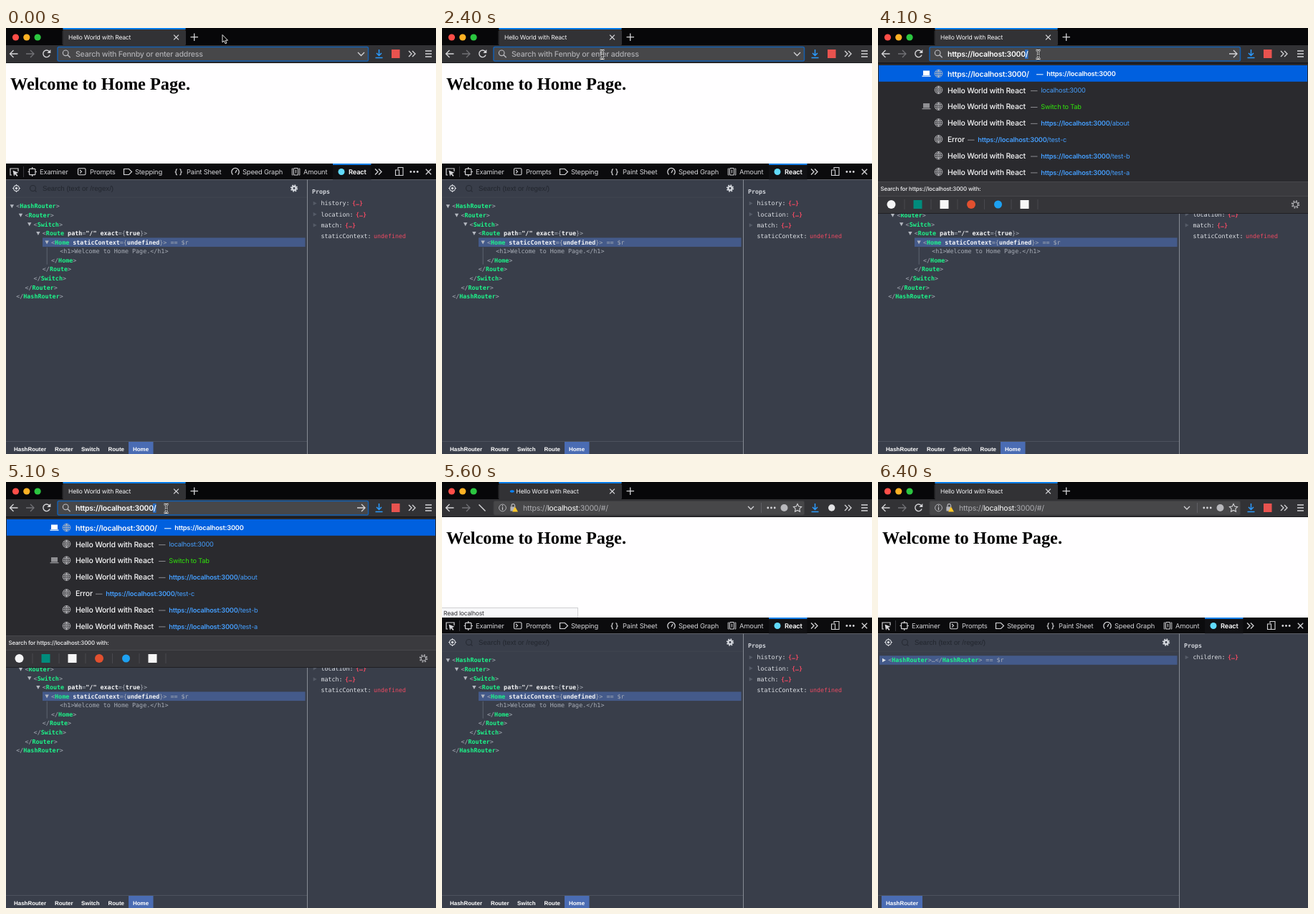
These frames come from a looping animation (600x594 px, 6.5 s). An HTML page:

```html
<!DOCTYPE html>
<html lang="en">
<head>
<meta charset="utf-8">
<title>Router demo</title>
<style>
html, body { margin: 0; width: 100%; height: 100%; overflow: hidden; background: #fff; }
svg { display: block; width: 100%; height: 100%; }
text { white-space: pre; text-rendering: geometricPrecision; }
.ui { font-family: Inter, Roboto, sans-serif; letter-spacing: -.02em; }
.mono { font: 8.4px "DejaVu Sans Mono", monospace; fill: #a9aeb8; }
.arial { font-family: "Liberation Sans", Arial, sans-serif; }
.serif { font-family: "Liberation Serif", Times, serif; }
.b { font-weight: bold; }
.tag { fill: #1df58a; font-weight: bold; }
.attr { fill: #f4f5f7; font-weight: bold; }
.red { fill: #ee4a62; }
</style>
</head>
<body>
<svg id="stage" viewBox="0 0 600 594"></svg>
<script>
const LOOP = 6500;
const PASTE = 2500, LOAD = 5200, CONNECT = 5700, READY = 6300;
const LIGHT = '#d5d5d8';

const esc = s => s.replace(/&/g, '&amp;').replace(/</g, '&lt;');
const rect = (x, y, w, h, fill, extra = '') =>
  `<rect x="${x}" y="${y}" width="${w}" height="${h}" fill="${fill}" ${extra}/>`;
const circle = (x, y, r, fill, extra = '') =>
  `<circle cx="${x}" cy="${y}" r="${r}" fill="${fill}" ${extra}/>`;
const line = (d, color = LIGHT, w = 1.3, extra = '') =>
  `<path d="${d}" fill="none" stroke="${color}" stroke-width="${w}" ${extra}/>`;
const shape = (d, fill = LIGHT) => `<path d="${d}" fill="${fill}"/>`;
const text = (x, y, size, fill, s, cls = 'ui', extra = '') =>
  `<text x="${x}" y="${y}" class="${cls}" fill="${fill}" font-size="${size}" ${extra}>${s}</text>`;
const group = (id, ...parts) => `<g id="${id}">${parts.join('')}</g>`;
const span = (cls, s) => `<tspan class="${cls}">${esc(s)}</tspan>`;
const medium = 'font-weight="500"';
const semi = 'font-weight="600"';

const dots = (x, y, fill = LIGHT) =>
  [-4.7, 0, 4.7].map(d => circle(x + d, y, 1.4, fill)).join('');
const chevrons = (x, y) =>
  line(`M${x - 4.5} ${y - 4}l4 4l-4 4M${x + .5} ${y - 4}l4 4l-4 4`);
const cross = (x, y, r) =>
  line(`M${x - r} ${y - r}l${2 * r} ${2 * r}M${x + r} ${y - r}l${-2 * r} ${2 * r}`);
const gear = (x, y, r, color, hole) =>
  circle(x, y, r, 'none', `stroke="${color}" stroke-width="2" stroke-dasharray="${r * Math.PI / 8}"`) +
  circle(x, y, r - 1.6, 'none', `stroke="${color}" stroke-width="${hole}"`);
const globe = (x, y) =>
  line(`M${x - 5.3} ${y}a5.3 5.3 0 1 0 10.6 0a5.3 5.3 0 1 0 -10.6 0h10.6M${x} ${y - 5.3}v10.6` +
    `M${x - 4.5} ${y - 2.6}h9M${x - 4.5} ${y + 2.6}h9` +
    `M${x} ${y - 5.3}q-5 5.3 0 10.6q5 -5.3 0 -10.6`, '#bdbdc0', .8);
const laptop = (x, y, color) =>
  rect(x - 4.5, y - 4, 9, 6.5, color) + rect(x - 6, y + 3, 12, 1.3, color);
const lens = (x, y, r, color) =>
  circle(x, y, r, 'none', `stroke="${color}" stroke-width="1.2"`) +
  line(`M${x + r * .7} ${y + r * .7}l${r} ${r}`, color, 1.4);

function chrome() {
  const lights = ['#ff4e48', '#fdb124', '#2bc640'];
  return rect(0, 0, 600, 25, '#070709') +
    lights.map((c, i) => circle(13.5 + 15.3 * i, 13, 4.6, c)).join('') +
    rect(79.5, 0, 171, 25, '#323235') + rect(79.5, 0, 171, 2, '#0a7de8') +
    line('M79 4v19M250.5 4v19', '#38383b', .8) +
    cross(237.5, 13, 3.4) + line('M257.5 12.7h10.5M262.7 7.5v10.5') +
    rect(0, 24, 600, 25, '#323235') + line('M0 48.5h600', '#18181b', 1) +
    line('M16.5 36h-11M10.5 31l-5 5l5 5') +
    line('M28 36h11M34 31l5 5l-5 5', '#717175') +
    line('M520.5 30v8M517 35l3.5 3.5l3.5 -3.5M515.5 41.5h10', '#2b9bff', 1.5) +
    chevrons(566.5, 36) + line('M585 32h9M585 36h9M585 40h9');
}

function addressBar() {
  const field = (fill, stroke, w) =>
    rect(72, 26.5, 433.5, 19.5, fill, `rx="2" stroke="${stroke}" stroke-width="${w}"`);
  return group('focused',
      field('#474749', '#155fae', 1.5), lens(83.2, 34.8, 3.8, '#bcbcc0')) +
    group('empty',
      text(97, 40, 10.55, '#aeaeb2', 'Search with Fennby or enter address', 'ui', medium),
      line('M491 34l4.5 4.5l4.5 -4.5')) +
    group('typed',
      rect(205, 30, 4.5, 13, '#2a6bbd'),
      text(97, 40, 10.4, '#fff', 'https://localhost:3000/', 'ui', semi),
      line('M490 36h11M496 31l5 5l-5 5')) +
    group('visited',
      field('#474749', '#3d3d40', 1),
      circle(84.5, 36, 4.9, 'none', 'stroke="#b5b5b9"'), line('M84.5 35v4M84.5 32.6v1.3', '#c8c8cb', 1.2),
      line('M97 35v-2a2.3 2.3 0 0 1 4.6 0v2', '#b5b5b9', 1.2), rect(95.4, 34.5, 6, 6, '#b5b5b9'),
      shape('M102 34.5l4 7h-8z', '#ffc928'),
      text(113, 40, 10.5, '#adadb1', `https://<tspan fill="#fff">localhost</tspan>:3000/#/`),
      line('M427 34l4 4l4 -4'), line('M445.5 29v14', '#606064', 1),
      dots(459.5, 36), circle(477.5, 36, 5, '#b8b8bc'),
      line('M496 30.5l1.7 3.6l3.9 .5l-2.8 2.8l.7 3.9l-3.5 -1.9l-3.5 1.9l.7 -3.9l-2.8 -2.8l3.9 -.5z', LIGHT, 1.1));
}

function tools() {
  const names = [[47, 'Examiner'], [117, 'Prompts'], [180, 'Stepping'],
    [252, 'Paint Sheet'], [330, 'Speed Graph'], [415, 'Amount']];
  return rect(0, 189, 600, 22.5, '#0b0b0d') +
    line('M8 205h-2v-9h11v4', LIGHT, 1.2) + shape('M9.5 198.5l8 3.2l-3.4 1.3l2.5 2.7l-1.3 1.2l-2.6 -2.8l-1.6 2.7z') +
    line('M24.5 193v15', '#38383c', 1) +
    rect(32.5, 196.3, 8.4, 8.4, 'none', `rx="1" stroke="${LIGHT}" stroke-width="1.2"`) +
    line('M36.7 194v2M36.7 205v2M30.5 200.5h2M41 200.5h2', LIGHT, 1.2) +
    rect(100.5, 195.8, 10.5, 9, 'none', `rx="1.5" stroke="${LIGHT}" stroke-width="1.1"`) +
    line('M103 198l2.5 2.3l-2.5 2.3', LIGHT, 1.1) +
    line('M164.5 196.5h7l4 4l-4 4h-7z', LIGHT, 1.2) +
    text(235, 204, 10, LIGHT, '{ }', 'ui', semi) +
    line('M316.5 204.5a5.2 5.2 0 1 1 7 0M320 202l2 -4', LIGHT, 1.3) +
    rect(401.5, 195.5, 6, 9.5, 'none', `rx="1" stroke="${LIGHT}" stroke-width="1.1"`) +
    line('M400.3 196h-1v9h1M408.8 196h1v9h-1', LIGHT, 1) + line('M404.5 197.5v5', LIGHT, 1) +
    names.map(([x, s]) => text(x, 203.6, 9.4, '#d2d2d5', s)).join('') +
    rect(456, 189, 53.5, 22.5, '#111114') + rect(456, 189, 53.5, 2, '#0a7de8') +
    circle(468, 200.5, 4.5, '#61dafb') + text(478, 203.6, 9.3, '#fff', 'React', 'ui', semi) +
    chevrons(519.5, 200.5) +
    line('M547 197v-2.5h7v11h-5M543.5 198h5v7.5h-5z', LIGHT, 1.1) + dots(569.5, 200.5) + cross(589.5, 200.5, 3.7);
}

const rowY = i => 248.5 + 12.57 * i;
const code = (depth, i, s) =>
  `<text class="mono" x="${14.2 + 12.2 * depth}" y="${rowY(i) + 2.9}">${s}</text>`;
const twisty = (x, y, open, fill = '#b4b8c0') =>
  shape(open ? `M${x - 2.7} ${y - 2.3}h5.4l-2.7 5z` : `M${x - 2.3} ${y - 2.7}v5.4l5 -2.7z`, fill);
const openTag = (name, attrs = '') => esc('<') + span('tag', name) + attrs + '>';
const closeTag = name => esc('</') + span('tag', name) + '>';

function prop(i, name, value, nested = true) {
  const y = 244.5 + 15.25 * i, size = 'style="font-size:8.3px"';
  return (nested ? twisty(431, y, false, '#555b67') : '') +
    `<text class="mono" ${size} x="439.5" y="${y + 2.8}"><tspan fill="#dfe2e7">${name}:</tspan></text>` +
    `<text class="mono b" ${size} x="${439.5 + 5 * (name.length + 1) + 3.5}" y="${y + 2.8}">` +
    `<tspan class="red" font-weight="${nested ? 'bold' : 'normal'}">${value}</tspan></text>`;
}

function crumbs(list) {
  return list.map(([x, s], i) => {
    const last = i === list.length - 1;
    const w = s.length > 5 ? 57 : 34.5;
    return (last ? rect(x - 6, 577, w, 17, '#4a6cb3') : '') +
      text(x, 589.7, 7.95, '#fff', s, 'arial b');
  }).join('');
}

function panel() {
  const outer = ['HashRouter', 'Router', 'Switch'];
  const back = ['Home', 'Route', 'Switch', 'Router', 'HashRouter'];
  const route = ' ' + span('attr', 'path') + '=' + span('attr', '"/"') + ' ' +
    span('attr', 'exact') + '={' + span('attr', 'true') + '}';
  const home = ' ' + span('attr', 'staticContext') + '={' + span('attr', 'undefined') + '}';
  return group('panel',
    rect(0, 211.5, 600, 383, '#393e4a'),
    line('M0 236.2h420', '#434854', .8), line('M0 576.5h420', '#525763', .8),
    line('M420.5 211.5v383', '#858a94', 1),
    circle(14.5, 223.5, 3.9, 'none', 'stroke="#d5d8dd" stroke-width="1.2"'), circle(14.5, 223.5, 1.7, '#d5d8dd'),
    line('M14.5 218v2M14.5 227v2M9 223.5h2M18 223.5h2', '#d5d8dd', 1.1),
    circle(37.5, 223.5, 4, 'none', 'stroke="#272b34" stroke-width="1.1"'), line('M40.5 226.5l2 2', '#272b34', 1.1),
    text(51, 227, 9.7, '#22262e', 'Search (text or /regex/)', 'arial'),
    gear(402, 223.5, 4.2, '#d3d6dc', 2.4),
    `<text class="mono b" style="font-size:8.3px" x="427" y="230.6"><tspan fill="#d4d7dd">Props</tspan></text>`,
    group('tree',
      rect(51, rowY(4) - 6.3, 366.5, 12.6, '#445a8a'),
      line(`M57.2 ${rowY(4) + 7}v24`, '#686e7a', .8),
      [0, 1, 2, 3, 4].map(i => twisty(8.3 + 12.2 * i, rowY(i), true)).join(''),
      outer.map((s, i) => code(i, i, openTag(s))).join(''),
      code(3, 3, openTag('Route', route)),
      code(4, 4, openTag('Home', home) + ' == $r'),
      code(5, 5, esc('<h1>Welcome to Home Page.</h1>')),
      back.map((s, i) => code(4 - i, 6 + i, closeTag(s))).join(''),
      ['history', 'location', 'match'].map((s, i) => prop(i, s, '{…}')).join(''),
      prop(3, 'staticContext', 'undefined', false),
      crumbs([[11, 'HashRouter'], [68, 'Router'], [105, 'Switch'], [142.5, 'Route'], [177, 'Home']])),
    group('folded',
      rect(2, rowY(0) - 6.3, 415.5, 12.6, '#445a8a'),
      twisty(8.3, rowY(0), false, '#dfe2e7'),
      code(0, 0, openTag('HashRouter') + '…' + closeTag('HashRouter') + ' == $r'),
      prop(0, 'children', '{…}'),
      crumbs([[11, 'HashRouter']])));
}

function dropdown() {
  const blue = '#459fff', host = 'https://localhost:3000';
  const title = 'Hello World with React';
  const url = path => `<tspan font-weight="600">${host}</tspan>${path}`;
  const rows = [
    [host + '/', 221, `<tspan font-weight="600">${host}</tspan>`, '#fff'],
    [title, 213, 'localhost:3000', blue],
    [title, 213, 'Switch to Tab', '#30e60b'],
    [title, 213, url('/about'), blue],
    ['Error', 125, url('/test-c'), blue],
    [title, 213, url('/test-b'), blue],
    [title, 213, url('/test-a'), blue]];
  const list = rows.map(([name, x, rest, fill], i) => {
    const y = 64 + 22.85 * i;
    return globe(84.5, y - .5) +
      text(97, y + 3.7, 10.5, '#f9f9fa', name, 'ui', i ? medium : semi) +
      line(`M${x} ${y + .8}h9.5`, i ? '#8b8b90' : '#fff', 1) +
      text(x + 14.3, y + 3.4, 9.2, fill, rest);
  }).join('');
  const engines = [
    circle(18.5, 246, 6, '#f5f5f6'), rect(49.5, 240, 12, 12, '#008c7c'),
    rect(86.5, 240, 12, 12, '#f7f7f7'), circle(130, 246, 6, '#e2502f'),
    circle(167.5, 246, 5.5, '#1da1f2'), rect(198.5, 240, 12, 12, '#f7f7f7')];
  return group('menu',
    rect(0, 49, 600, 210, '#2a2a2e'), rect(0, 49, 600, 1, '#1b1b1e'),
    rect(1, 52, 598, 22.8, '#0060df'),
    laptop(67.5, 63.5, '#fff'), laptop(67.5, 109, '#8f8f93'), list,
    rect(0, 214, 600, 45, '#3a3a3e'), line('M0 214.5h600M0 234.5h600', '#4b4b4f', .8),
    text(3.5, 227, 7.9, '#f0f0f2', `Search for ${host} with:`, 'ui', medium),
    rect(0, 235, 600, 23.5, '#353539'),
    [37, 74, 111, 148.5, 186, 223].map(x => line(`M${x} 239v14`, '#505055', .8)).join(''),
    engines.join(''), gear(582.5, 246, 4.8, '#a9a9ad', 1.2), rect(0, 258, 600, 1, '#202024'));
}

const beam = 'M-3 -6q3 0 3 2v8q0 2 -3 2M3 -6q-3 0 -3 2v8q0 2 3 2M-1.6 1.5h3.2';
const stage = document.getElementById('stage');
stage.innerHTML =
  rect(0, 0, 600, 594, '#fffeff') + chrome() + addressBar() +
  text(87, 16.3, 8.5, '#f5f5f7', 'Hello World with React', 'ui', 'id="title"') +
  group('reload', line('M60.5 33a4.8 4.8 0 1 0 .6 4.6', LIGHT, 1.4), shape('M62.3 30v5h-5z')) +
  group('stop', line('M51.5 31.5l9 9', LIGHT, 1.4)) +
  group('spinner', `<ellipse id="dot" cy="13" rx="3" ry="1.7" fill="#0a84ff"/>`) +
  group('badgeDev', rect(538, 30, 11.5, 12, '#e8534f')) +
  group('badgeIdle', circle(543.7, 36, 4.7, '#e3e3e5')) +
  text(6, 86, 24.3, '#000', 'Welcome to Home Page.', 'serif b') +
  group('status', rect(-1, 175.5, 190.5, 14, '#f8f8fa', 'stroke="#c5c5c9" stroke-width=".8"'),
    text(2, 186, 8.5, '#2d2d30', 'Read localhost')) +
  tools() + panel() +
  group('connecting', text(300, 264.3, 16.1, '#a9a9ab', 'Connecting to React…', 'arial b', 'text-anchor="middle"')) +
  dropdown() +
  group('arrow', `<path d="M0 -6v10.5l2.4 -2.2l1.7 4l1.8 -.8l-1.7 -3.8h3.3z" fill="#000" stroke="#fff" stroke-width=".9"/>`) +
  group('beam', line(beam, '#fff', 2.4), line(beam, '#111', .9));

const el = {};
stage.querySelectorAll('[id]').forEach(n => el[n.id] = n);
const show = (id, on) => { el[id].style.display = on ? '' : 'none'; };

function render(t) {
  const empty = t < PASTE, focused = t < LOAD;
  const loading = !focused && t < CONNECT;
  const connecting = t >= CONNECT && t < READY;

  show('focused', focused);
  show('empty', empty);
  show('typed', focused && !empty);
  show('menu', focused && !empty);
  show('visited', !focused);
  for (const id of ['stop', 'spinner', 'badgeIdle', 'status']) show(id, loading);
  show('reload', !loading);
  show('badgeDev', !loading);
  show('panel', !connecting);
  show('connecting', connecting);
  show('tree', t < CONNECT);
  show('folded', t >= READY);

  el.title.setAttribute('x', loading ? 103.5 : 87);
  el.dot.setAttribute('cx', 95 + 4 * Math.sin((t - 5500) / 130));

  // pointer glides from the tab strip into the address field
  const p = Math.min(1, Math.max(0, (t - 100) / 1000));
  const k = 1 - (1 - p) ** 3;
  const x = 302 - 78.5 * k, y = 15.5 + 21.5 * k;
  const inField = y > 27;
  show('arrow', focused && !inField);
  show('beam', focused && inField);
  for (const id of ['arrow', 'beam']) el[id].setAttribute('transform', `translate(${x} ${y})`);
}

let start;
function tick(now) {
  start ??= now;
  render((now - start) % LOOP);
  requestAnimationFrame(tick);
}
render(0);
requestAnimationFrame(tick);
</script>
</body>
</html>
```
